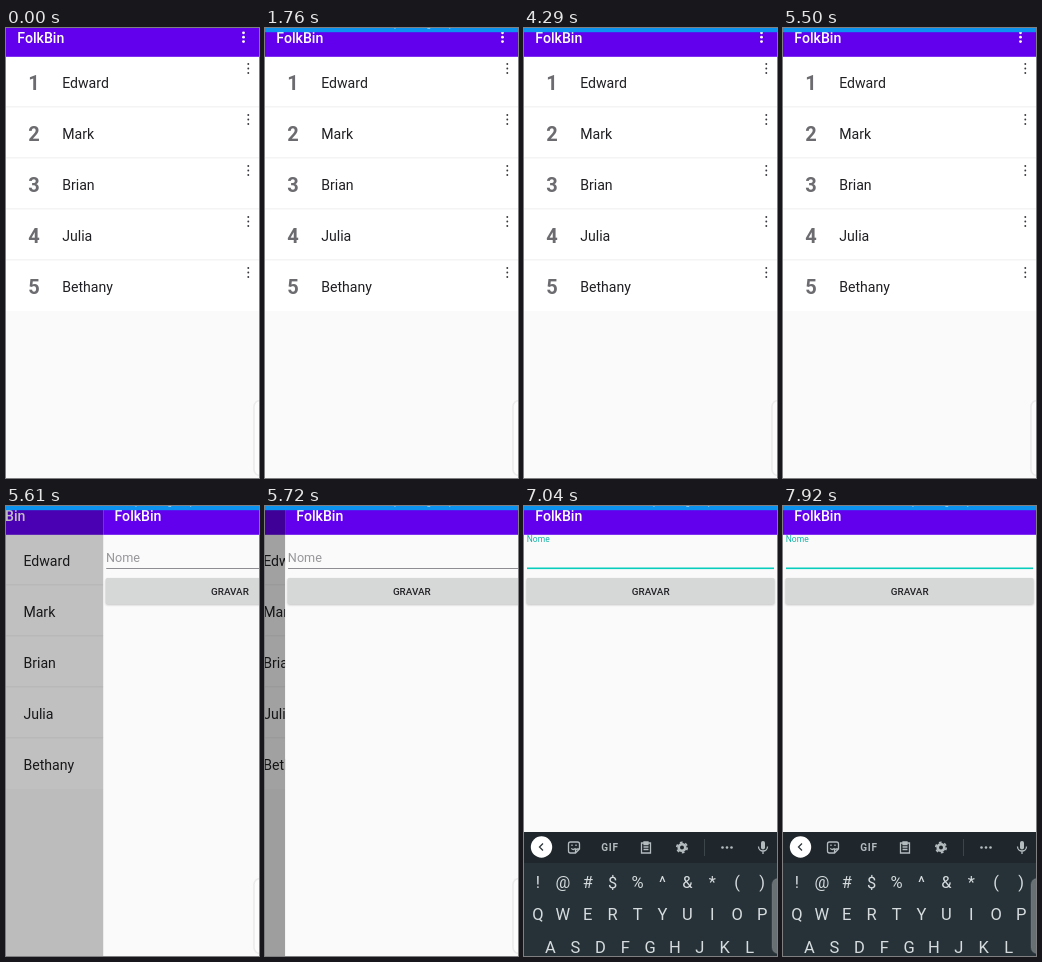
Animation, 253 px wide and 450 px high, one loop 8 s. Source, as an HTML page:

```html
<!DOCTYPE html>
<html lang="pt">
<head>
<meta charset="utf-8">
<style>
html, body { margin: 0; width: 100%; height: 100%; overflow: hidden; background: #fafafa; }
svg { display: block; width: 253px; height: 450px; font-family: Roboto, sans-serif; }
.title { font-size: 14.1px; font-weight: 500; fill: #fff; }
.num { font-size: 20px; font-weight: 700; fill: #6c6c70; text-anchor: middle; }
.name { font-size: 14.1px; fill: #202024; }
.key { font-size: 16.5px; fill: #d6dcde; text-anchor: middle; }
.icon { fill: none; stroke: #b4bcc0; stroke-width: 1.3; }
</style>
</head>
<body>
<svg viewBox="0 0 253 450">
  <defs>
    <clipPath id="below"><rect y="28" width="253" height="422"/></clipPath>
    <clipPath id="strip"><rect width="253" height="4.4"/></clipPath>
    <filter id="soft" x="-50%" y="-50%" width="200%" height="200%"><feGaussianBlur stdDeviation="1.2"/></filter>
    <g id="header">
      <rect width="253" height="28.8" fill="#6200ee"/>
      <text class="title" x="11.3" y="14.8">FolkBin</text>
    </g>
    <g id="hook">
      <path d="M6.2-1.2A6.3 6.3 0 0 0-5.9-2.2" fill="none" stroke="#1695cb" stroke-width="1.4"/>
      <path d="M-7.4-4.2V-.4H-3.600Z" fill="#1695cb"/>
    </g>
  </defs>

  <g id="list">
    <rect width="253" height="450" fill="#fafafa"/>
    <g id="rows"></g>
    <g clip-path="url(#below)">
      <g id="spinner">
        <circle r="14.2" cy=".6" fill="#000" opacity=".18" filter="url(#soft)"/>
        <circle r="14" fill="#fafafa"/>
        <g id="turn">
          <use href="#hook"/>
          <use href="#hook" transform="rotate(180)"/>
        </g>
      </g>
    </g>
    <use href="#header"/>
    <g id="menu"></g>
  </g>
  <rect id="scrim" width="253" height="450"/>

  <g id="form">
    <rect width="253" height="450" fill="#fafafa"/>
    <use href="#header"/>
    <text id="label" x="2.8">Nome</text>
    <rect id="line" x="3" width="247"/>
    <rect id="caret" x="3" y="42" width="1.2" height="18" fill="#12b9ae"/>
    <rect x="2.5" y="73" width="248" height="26" rx="1.5" fill="#000" opacity=".22" filter="url(#soft)"/>
    <rect x="2.5" y="72" width="248" height="26" rx="1.5" fill="#d6d7d7"/>
    <text x="126.7" y="89.2" text-anchor="middle" font-size="9.85" font-weight="500" fill="#222226">GRAVAR</text>
  </g>

  <g id="keyboard">
    <rect y="326" width="253" height="124" fill="#263238"/>
    <rect y="326" width="253" height="31" fill="#1f272c"/>
    <circle cx="17.5" cy="341" r="10.7" fill="#fff"/>
    <path class="icon" d="M19 337.5l-3.5 3.5 3.5 3.5" style="stroke:#30383c"/>
    <path class="icon" d="M46.5 336h7a2 2 0 0 1 2 2v5l-4 4h-5a2 2 0 0 1-2-2v-7a2 2 0 0 1 2-2zM55.5 343h-2a2 2 0 0 0-2 2v2M47.3 342.3q2 2.4 4.3 0M48 338.5v1.5M52 338.5v1.5"/>
    <text x="86" y="344.7" text-anchor="middle" font-size="10" font-weight="700" letter-spacing=".7" fill="#b4bcc0">GIF</text>
    <path class="icon" d="M117.5 337h9v10h-9zM120 336h4v2.5h-4zM119.5 341h5M119.5 343.5h5"/>
    <circle class="icon" cx="158" cy="341.5" r="3.3" style="stroke-width:2.6"/>
    <circle class="icon" cx="158" cy="341.5" r="5.2" style="stroke-width:1.7" stroke-dasharray="2.7 2.745"/>
    <path d="M180.5 333v17" stroke="#3b454a"/>
    <g id="more" fill="#b4bcc0"></g>
    <rect x="237" y="335" width="4" height="8.5" rx="2" fill="#b4bcc0"/>
    <path class="icon" d="M234.5 340.5a4.5 4.5 0 0 0 9 0M239 345v3"/>
    <g id="keys"></g>
  </g>

  <rect x="248" y="372.5" width="14" height="75" rx="6" fill="#fff" fill-opacity=".3" stroke="#969696" stroke-opacity=".16" stroke-width="1.6"/>

  <g id="bar" clip-path="url(#strip)">
    <rect width="253" height="4.4" fill="#0b93ef"/>
    <text id="note" x="129" y="-1" font-size="8.5" fill="#fff" opacity=".65">para ver gravação</text>
  </g>
</svg>
<script>
const LOOP = 8000;
const $ = id => document.getElementById(id);
const clamp = v => Math.max(0, Math.min(1, v));
const span = (t, from, to) => clamp((t - from) / (to - from));
const mix = (a, b, k) => a + (b - a) * k;
const out = k => 1 - (1 - k) ** 3;
const smooth = k => k * k * (3 - 2 * k);
const set = (id, attrs) => {
  for (const k in attrs) $(id).setAttribute(k, attrs[k]);
};
const dots = (x, y, gap, r, fill) => [-1, 0, 1].map(i =>
  `<circle cx="${x}" cy="${y + i * gap}" r="${r}" fill="${fill}"/>`).join('');

$('rows').innerHTML = ['Edward', 'Mark', 'Brian', 'Julia', 'Bethany'].map((name, i) => {
  const y = 28 + i * 51;
  const rule = i ? `<rect y="${y - 1}" width="253" height="1.5" fill="#f4f4f4"/>` : '';
  return `<rect y="${y}" width="253" height="51" fill="#fff"/>${rule}
    <text class="num" x="28" y="${y + 34}">${i + 1}</text>
    <text class="name" x="56.2" y="${y + 31.8}">${name}</text>` +
    dots(242.3, y + 12.5, 4.5, .95, '#38383e');
}).join('');
$('menu').innerHTML = dots(237.5, 9.2, 4.4, 1.4, '#fff');
$('more').innerHTML = [-4.5, 0, 4.5].map(d => `<circle cx="${203 + d}" cy="341.5" r="1.3"/>`).join('');

const keyRow = (chars, x, y) => [...chars].map((c, i) =>
  `<text class="key" x="${x + i * 24.9}" y="${y}">${c === '&' ? '&amp;' : c}</text>`).join('');
$('keys').innerHTML = keyRow('!@#$%^&*()', 14, 381.5) +
  keyRow('QWERTYUIOP', 14, 413.5) + keyRow('ASDFGHJKL', 26.5, 447);

function drawSpinner(t) {
  const pull = smooth(span(t, 3170, 3400));
  const settle = out(span(t, 3580, 3740));
  const size = 1 - span(t, 3830, 3960);
  const y = mix(mix(13, 104, pull), 59, settle);
  const shown = t >= 3170 && size > 0;
  set('spinner', { visibility: shown ? 'visible' : 'hidden', transform: `translate(126.5 ${y}) scale(${size})` });
  set('turn', { transform: `rotate(${mix(180, 0, pull) - Math.max(0, t - 3580) * .6})` });
}

function draw(t) {
  drawSpinner(t);

  const slide = out(span(t, 5510, 5880));
  set('list', { transform: `translate(${-63 * slide} 0)` });
  set('scrim', { opacity: .4 * slide });
  set('form', { transform: `translate(${253 * (1 - slide)} 0)`, visibility: slide ? 'visible' : 'hidden' });

  const focused = t >= 6530;
  const lift = smooth(span(t, 6530, 6652));
  set('label', {
    y: mix(56.3, 36.3, lift),
    'font-size': mix(12.66, 8.5, lift),
    fill: focused ? '#16b3a8' : '#98989c'
  });
  set('line', {
    y: focused ? 61.5 : 62,
    height: focused ? 1.6 : .9,
    fill: focused ? '#08cdbd' : '#838387'
  });
  set('caret', { visibility: focused && (t - 6400) % 1000 < 500 ? 'inherit' : 'hidden' });

  const rise = out(span(t, 6710, 6960));
  set('keyboard', { transform: `translate(0 ${126 * (1 - rise)})`, visibility: rise ? 'visible' : 'hidden' });

  set('bar', { transform: `translate(0 ${-4.4 * (1 - out(span(t, 330, 550)))})` });
  const noted = t >= 1210 && t < 3190 || t >= 5610;
  set('note', { visibility: noted ? 'visible' : 'hidden' });
}

function tick() {
  draw(performance.now() % LOOP);
  requestAnimationFrame(tick);
}
tick();
</script>
</body>
</html>
```
